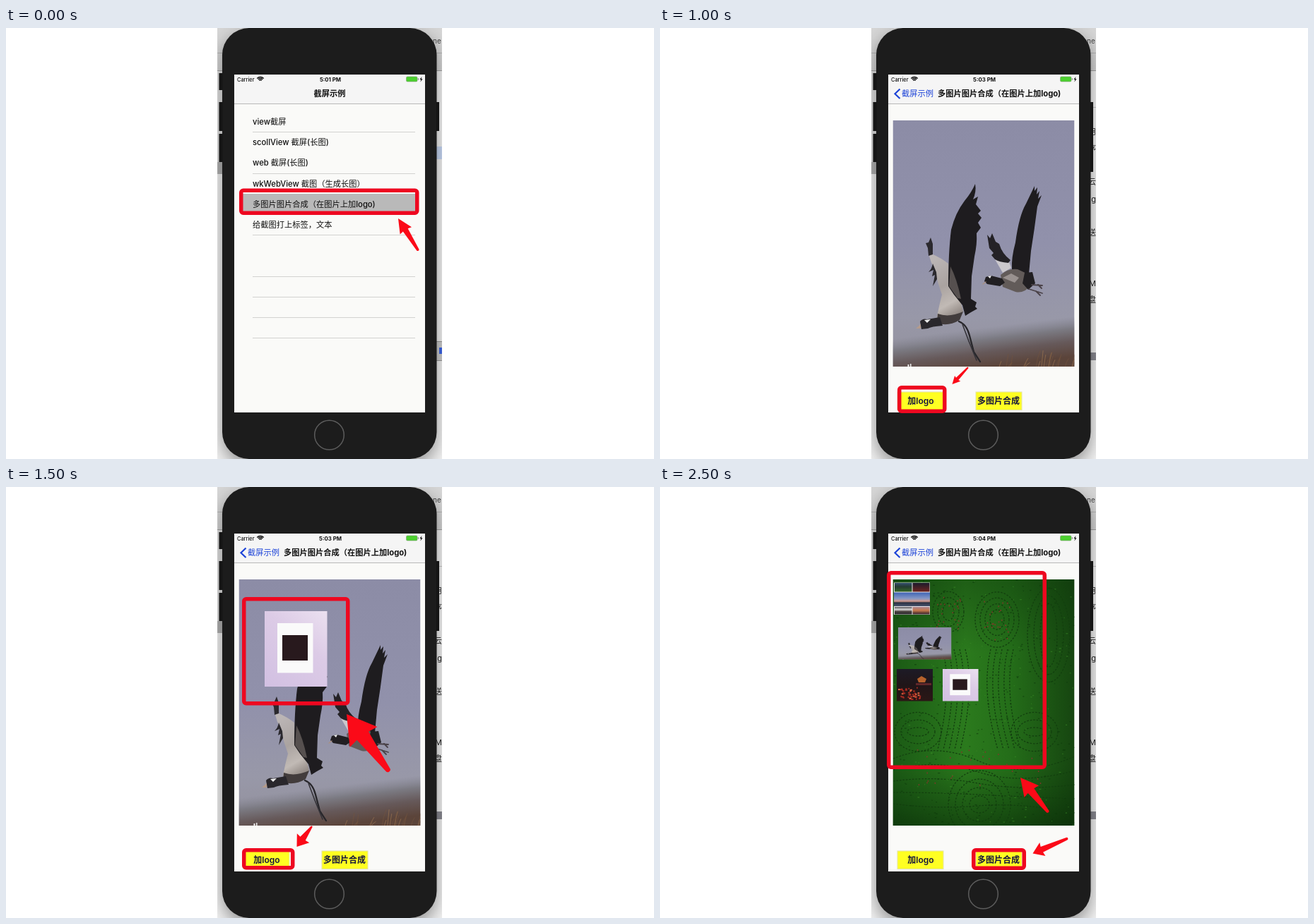
These frames come from a looping animation (917x611 px, 3000 ms). An HTML page with a canvas:

```html
<!DOCTYPE html>
<html lang="zh-CN">
<head>
<meta charset="utf-8">
<title>截屏示例</title>
<style>
html, body { margin: 0; width: 100%; height: 100%; overflow: hidden; background: #fff; }
canvas { display: block; }
</style>
</head>
<body>
<canvas id="stage" width="917" height="611"></canvas>
<script>
const ctx = document.getElementById('stage').getContext('2d');
const FONT = 'Inter, "Noto Sans CJK SC", "Noto Sans CJK", sans-serif';
const RED = '#ee0820', ARROW = '#fb0a18';
const PHOTO = [329.5, 131, 257, 349];
const LONG_TITLE = '多图片图片合成（在图片上加logo)';

function random(seed) {
  return () => (seed = (seed * 16807) % 2147483647) / 2147483647;
}

function rect(color, x, y, w, h) {
  ctx.fillStyle = color;
  ctx.fillRect(x, y, w, h);
}

function shape(color, path) {
  ctx.fillStyle = color;
  ctx.fill(new Path2D(path));
}

function line(color, width, path) {
  ctx.strokeStyle = color;
  ctx.lineWidth = width;
  ctx.stroke(new Path2D(path));
}

function gradient(x0, y0, x1, y1, ...colors) {
  const g = ctx.createLinearGradient(x0, y0, x1, y1);
  colors.forEach(([at, color]) => g.addColorStop(at, color));
  return g;
}

// y is the optical middle of the line
function text(str, x, y, size, { color = '#111', weight = 400, align = 'left' } = {}) {
  ctx.font = `${weight} ${size}px ${FONT}`;
  ctx.textAlign = align;
  ctx.fillStyle = color;
  ctx.fillText(str, x, y + size * 0.37);
}

// Edges are given for the outside of the stroke
function frame(left, top, right, bottom, width = 5.5) {
  ctx.strokeStyle = RED;
  ctx.lineWidth = width;
  ctx.beginPath();
  ctx.roundRect(left + width / 2, top + width / 2, right - left - width, bottom - top - width, 3);
  ctx.stroke();
}

function arrow(tipX, tipY, tailX, tailY, spread = 0.22, head = 0.38) {
  const length = Math.hypot(tailX - tipX, tailY - tipY);
  ctx.save();
  ctx.translate(tipX, tipY);
  ctx.rotate(Math.atan2(tailY - tipY, tailX - tipX));
  ctx.scale(length, length);
  ctx.fillStyle = ARROW;
  ctx.beginPath();
  ctx.moveTo(0, 0);
  ctx.lineTo(head, -spread);
  ctx.lineTo(head - 0.02, -spread * 0.42);
  ctx.lineTo(0.97, -0.035);
  ctx.arc(0.97, 0, 0.035, -Math.PI / 2, Math.PI / 2);
  ctx.lineTo(head - 0.02, spread * 0.42);
  ctx.lineTo(head, spread);
  ctx.fill();
  ctx.restore();
}

function inPhoto(draw) {
  ctx.save();
  ctx.beginPath();
  ctx.rect(...PHOTO);
  ctx.clip();
  draw();
  ctx.restore();
}

// Draws something made for the box "from" inside the box "to"
function fitted(from, to, draw) {
  ctx.save();
  ctx.translate(to[0], to[1]);
  ctx.scale(to[2] / from[2], to[3] / from[3]);
  ctx.translate(-from[0], -from[1]);
  draw();
  ctx.restore();
}

function desktop(list) {
  rect('#f4f4f4', 299, 0, 318, 611);
  rect('#d6d6d6', 299, 0, 318, 61);
  rect('#b4b4b4', 299, 35, 318, 1);
  rect('#a2a2a2', 299, 60, 318, 1);
  rect('#e2e2e2', 299, 61, 8, 129);
  rect('#b4b4b4', 299, 190, 8, 17);
  text('ne', 604, 18, 10, { color: '#444' });
  if (list) {
    rect('#c9d9f6', 609, 168, 8, 18);
    rect('#cfcfcf', 609, 444, 8, 27);
    rect('#999', 609, 444, 8, 1);
    rect('#999', 609, 471, 8, 1);
    rect('#3d66e8', 613, 453, 4, 9);
  } else {
    rect('#c4c4c4', 609, 112, 8, 1);
    [['用', 147], ['序', 171], ['云', 218], ['g', 243], ['送', 290], ['M', 362], ['盘', 385]]
      .forEach(([s, y]) => text(s, 617, y, 11, { align: 'right', color: '#222' }));
    rect('#8c8c94', 609, 460, 8, 11);
  }
}

function phone(list) {
  ctx.save();
  ctx.beginPath();
  ctx.rect(299, 0, 318, 611);
  ctx.clip();
  desktop(list);
  ctx.shadowColor = 'rgba(0,0,0,.42)';
  ctx.shadowBlur = 26;
  ctx.shadowOffsetY = 10;
  ctx.fillStyle = '#1c1c1c';
  ctx.beginPath();
  ctx.roundRect(306, 0, 303.5, 611, 38);
  ctx.fill();
  ctx.shadowColor = 'transparent';
  [[64, 24], [105, 41], [150, 40]].forEach(([y, h]) => rect('#151515', 301.5, y, 5, h));
  rect('#151515', 609, 105, 4, list ? 41 : 99);
  ctx.restore();

  ctx.strokeStyle = '#5c5c5c';
  ctx.lineWidth = 1.5;
  ctx.beginPath();
  ctx.arc(457.5, 577, 20.8, 0, 7);
  ctx.stroke();
  rect('#fafaf8', 323, 66, 270, 479);
  rect('#f5f5f5', 323, 66, 270, 41);
  rect('#b8b8b8', 323, 107, 270, 1);
}

function statusBar(time) {
  text('Carrier', 327, 73, 7.4, { weight: 500 });
  text(time, 459, 73, 7.8, { weight: 700, align: 'center' });
  ctx.lineCap = 'butt';
  ctx.strokeStyle = '#111';
  ctx.lineWidth = 1.5;
  [2.3, 4.4, 6.5].forEach(r => {
    ctx.beginPath();
    ctx.arc(360, 76, r, -Math.PI * 0.76, -Math.PI * 0.24);
    ctx.stroke();
  });
  ctx.fillStyle = '#4cd02f';
  ctx.beginPath();
  ctx.roundRect(566.5, 69, 15.5, 7, 1.5);
  ctx.fill();
  ctx.strokeStyle = '#7c9a74';
  ctx.lineWidth = 0.6;
  ctx.stroke();
  rect('#777', 582.8, 71.2, 1, 2.6);
  shape('#111', 'M588.5 69L585.5 73H587.3L586.4 76.5L589.6 72.2H587.7Z');
}

function listScreen() {
  statusBar('5:01 PM');
  text('截屏示例', 458, 93, 11.25, { weight: 700, align: 'center' });
  [147, 206, 293, 352, 381, 410, 439].forEach(y => rect('#d2d2d0', 349, y, 230, 1));
  rect('#b9b9b9', 334, 235, 246, 25);
  ['view截屏', 'scollView 截屏(长图)', 'web 截屏(长图)', 'wkWebView 截图（生成长图）', LONG_TITLE, '给截图打上标签，文本']
    .forEach((label, i) => text(label, 349, 132.7 + i * 29.3, 11.25, { weight: 500 }));
  frame(330, 227.5, 584.5, 265);
  arrow(555, 270, 583.5, 315.5, 0.18);
}

function detailScreen(time) {
  statusBar(time);
  line('#1c43d8', 2.2, 'M339.5 86.5L332.5 93.3L339.5 100');
  text('截屏示例', 342, 93, 11.25, { color: '#1c43d8', weight: 500 });
  text(LONG_TITLE, 393, 93, 11.25, { weight: 700 });
  [[335.5, '加logo', 369], [446.5, '多图片合成', 479]].forEach(([x, label, mid]) => {
    rect('#e4e4a4', x, 515.5, 66, 26.5);
    rect('#ffff22', x + 1, 516.5, 64, 24.5);
    text(label, mid, 528.5, 12, { color: '#15153c', weight: 600, align: 'center' });
  });
}

function cranes() {
  rect(gradient(0, 131, 0, 480, [0, '#8c8ca6'], [0.5, '#9191ab'], [0.8, '#9898a8'], [1, '#92909c']), ...PHOTO);
  rect(gradient(447, 426, 454, 482, [0, '#85859200'], [0.3, '#7b7a82'], [0.62, '#66595a'], [1, '#5b443a']), ...PHOTO);
  const rnd = random(77);
  ctx.lineCap = 'round';
  for (let i = 0; i < 26; i++) {
    const x = 480 + rnd() * 106, h = 5 + rnd() * 18;
    line(i % 3 ? '#75543f' : '#a37a52', 0.6, `M${x} 480q1 ${-h / 2} ${2 + rnd() * 4} ${-h}`);
  }
  rect('#eee', 350.5, 477, 2, 3);
  rect('#eee', 354, 476, 1.5, 4);

  // Near bird
  const plume = gradient(385, 330, 428, 405, [0, '#bbb5b5'], [0.45, '#aaa3a0'], [0.75, '#c1bab5'], [1, '#8a817c']);
  shape(plume, 'M380 303L384 320Q398 326 408 334L411 365L424 382L429 402Q412 414 392 409Q395 393 399 378Q393 362 389 344Q383 332 380 320Z');
  shape('#2b292e', 'M376 305L380 304L383 297L386 306L386 321L380 323L379 312Z M386 334Q385 341 380 346L387 343L385 352L389 350L386 366L392 356L391 346Z');
  shape('#1e1c1f', 'M446 221Q448 232 443 243L450 239L447 250L454 259L450 263L455 269L450 276L454 283L448 291Q449 306 445 324L441 352L440 384L448 389L446 395L449 398L440 403L432 408L428 393L416 378L408 366Q408 318 412 286Q418 262 431 245Q441 233 446 221Z');
  shape('#56504f', 'M411 338Q420 355 426 384L421 383L409 366Z');
  shape('#423c3c', 'M393 405Q409 411 429 402L424 414Q407 424 392 418Z');
  shape('#29272c', 'M396 410L400 422Q384 423 379 426L370 427L368 416Q372 411 378 413Z');
  shape('#ededed', 'M374 414L383 413L378 418Z');
  shape('#b59b8b', 'M369 420L362 426L369 426Z');
  line('#27262a', 2.3, 'M423 416Q434 420 438 436L444 459L453 473');
  line('#343238', 1.6, 'M428 420L437 444L448 471');

  // Far bird
  shape('#cbc8cc', 'M474 328L493 329L497 340L485 347Z');
  shape('#242226', 'M463 293L467 298L470 291L475 303L480 306Q484 320 496 329L493 333Q480 332 474 328L469 322L472 319L466 312Z');
  shape('#1e1c1f', 'M530 224L530 231L534 226L533 236L537 231L535 242L540 237L534 253Q530 285 525 316L522 349L498 342Q497 326 503 304Q508 266 518 249Z');
  shape('#625b59', 'M482 350Q493 340 506 342L523 350L526 363Q516 377 503 374L485 367Z');
  shape('#99918f', 'M485 354L497 348L508 354L502 361Z');
  shape('#211f22', 'M516 347L527 346L531 362L521 371L513 362Z M461 353L468 351L484 355L488 361L481 366L463 363L459 359Z');
  shape('#eee', 'M464 352L469 351L467 355Z');
  line('#a99080', 1.3, 'M461 360L457 363');
  line('#4a4248', 1.8, 'M526 364L541 365M535 364L540 369M522 370L541 376M532 373L538 379');
}

// Lavender sheet with a plain square standing for the mark
function card() {
  rect(gradient(366, 283, 454, 176, [0, '#d2c0e2'], [0.6, '#dccbe6'], [1, '#ebe0f0']), 366, 176, 88.5, 107);
  rect('#fafafa', 384, 193, 50.5, 70.5);
  rect('#28191d', 391, 210, 36, 36);
}

function rings(x, y, rx, ry, count, step) {
  for (let i = 0; i < count; i++) {
    ctx.beginPath();
    ctx.ellipse(x, y, rx + i * step, ry + i * step * 1.2, 0, 0, 7);
    ctx.stroke();
  }
}

function field() {
  rect(gradient(330, 0, 587, 0, [0, '#1b5a15'], [0.4, '#2b7a1d'], [0.65, '#246d19'], [1, '#164510']), ...PHOTO);
  rect(gradient(0, 131, 0, 480, [0, '#0a300960'], [0.3, '#0a300900'], [0.75, '#0a300900'], [1, '#06240590']), ...PHOTO);
  const rnd = random(2024);
  ctx.strokeStyle = '#123f0e';
  ctx.lineWidth = 1.3;
  ctx.setLineDash([2.5, 2]);
  rings(408, 177, 8, 12, 3, 7);
  rings(477, 188, 10, 14, 4, 7);
  rings(365, 347, 15, 6, 3, 9);
  rings(530, 347, 15, 6, 3, 9);
  rings(452, 450, 14, 12, 4, 10);
  rings(550, 210, 12, 45, 3, 9);
  for (let i = 0; i < 5; i++) {
    const d = i * 8;
    line('#123f0e', 1.3, `M${432 - d} 230Q${446 - d} 285 ${425 - d} 372M${468 + d} 230Q${454 + d} 290 ${478 + d} 372`);
    line('#123f0e', 1.2, `M330 ${385 + d * 2}q60 ${-24 + d} 120 3t137 ${-6 + d / 2}`);
  }
  ctx.setLineDash([]);
  for (let i = 0; i < 420; i++) {
    rect(i % 3 ? '#0d370b99' : '#3a8d2788', 330 + rnd() * 257, 131 + rnd() * 349, 1 + rnd() * 2, 1.3);
  }
  for (let i = 0; i < 75; i++) {
    const [x, y, w, h] = [[408, 178, 34, 45], [475, 190, 38, 60], [450, 396, 180, 55]][i % 3];
    rect('#85342a', x + (rnd() - 0.5) * w, y + (rnd() - 0.5) * h, 1.4, 1.8);
  }
}

function collage() {
  rect('#e8e6e8', 331, 135.5, 51, 45.5);
  rect(gradient(0, 136, 0, 149, [0, '#34506f'], [0.4, '#243b32'], [1, '#356a25']), 332, 136, 24.5, 12.5);
  rect(gradient(0, 136, 0, 149, [0, '#1c1b2c'], [1, '#70251f']), 357.5, 136, 24, 12.5);
  rect(gradient(0, 149, 0, 169, [0, '#3c62b4'], [0.45, '#8598c5'], [0.65, '#d39a8c'], [0.75, '#2b3142'], [1, '#46536d']), 331, 149.5, 51, 19.5);
  rect(gradient(0, 170, 0, 180, [0, '#59565b'], [0.4, '#ddd'], [0.6, '#554c48'], [1, '#262428']), 332, 170, 24.5, 10.5);
  rect(gradient(0, 170, 0, 180, [0, '#a88491'], [0.5, '#c77a4c'], [1, '#39242a']), 357.5, 170, 24, 10.5);
}

function nightView() {
  rect(gradient(0, 258, 0, 303, [0, '#1d1b26'], [0.5, '#201518'], [1, '#2b1716']), 335, 258, 51, 45.5);
  shape('#b5622c', 'M364 272L370 268L377 272L375 277H366Z');
  const rnd = random(9);
  for (let i = 0; i < 38; i++) {
    rect(i % 4 ? '#a72b22' : '#dd6540', 337 + rnd() * 34, 283 + rnd() * 17, 1.5 + rnd() * 2, 2);
  }
  rect('#60272a', 362, 278, 22, 3);
}

function collection() {
  inPhoto(field);
  collage();
  fitted(PHOTO, [337, 199, 75.5, 45.5], () => inPhoto(cranes));
  nightView();
  fitted([366, 176, 88.5, 107], [400, 258, 50.5, 45.5], card);
}

const scenes = [
  listScreen,
  () => { detailScreen('5:03 PM'); inPhoto(cranes); },
  () => {
    detailScreen('5:03 PM');
    inPhoto(cranes);
    frame(336, 507, 405.5, 546);
    arrow(413.5, 505, 436, 481, 0.17, 0.34);
  },
  () => {
    detailScreen('5:03 PM');
    inPhoto(cranes);
    card();
    frame(334, 156, 486.5, 309.5);
    arrow(482, 322, 542, 403, 0.24, 0.4);
    frame(334, 512, 408.5, 542.5);
    arrow(411.5, 510, 433, 481, 0.3, 0.42);
  },
  () => {
    detailScreen('5:04 PM');
    inPhoto(cranes);
    frame(439, 509, 519, 545);
    arrow(527.5, 508.5, 569.5, 487.5, 0.23, 0.34);
  },
  () => {
    detailScreen('5:04 PM');
    collection();
    frame(321, 119, 547, 400);
    arrow(510, 412, 549.5, 461, 0.21, 0.4);
    frame(441, 512, 518, 543);
    arrow(527.5, 519.5, 577, 498, 0.19, 0.28);
  },
];

let shown = -1;
function tick() {
  const index = Math.floor((performance.now() % 3000) / 500);
  if (index !== shown) {
    shown = index;
    rect('#fff', 0, 0, 917, 611);
    phone(index === 0);
    scenes[index]();
  }
  requestAnimationFrame(tick);
}
tick();
</script>
</body>
</html>
```
